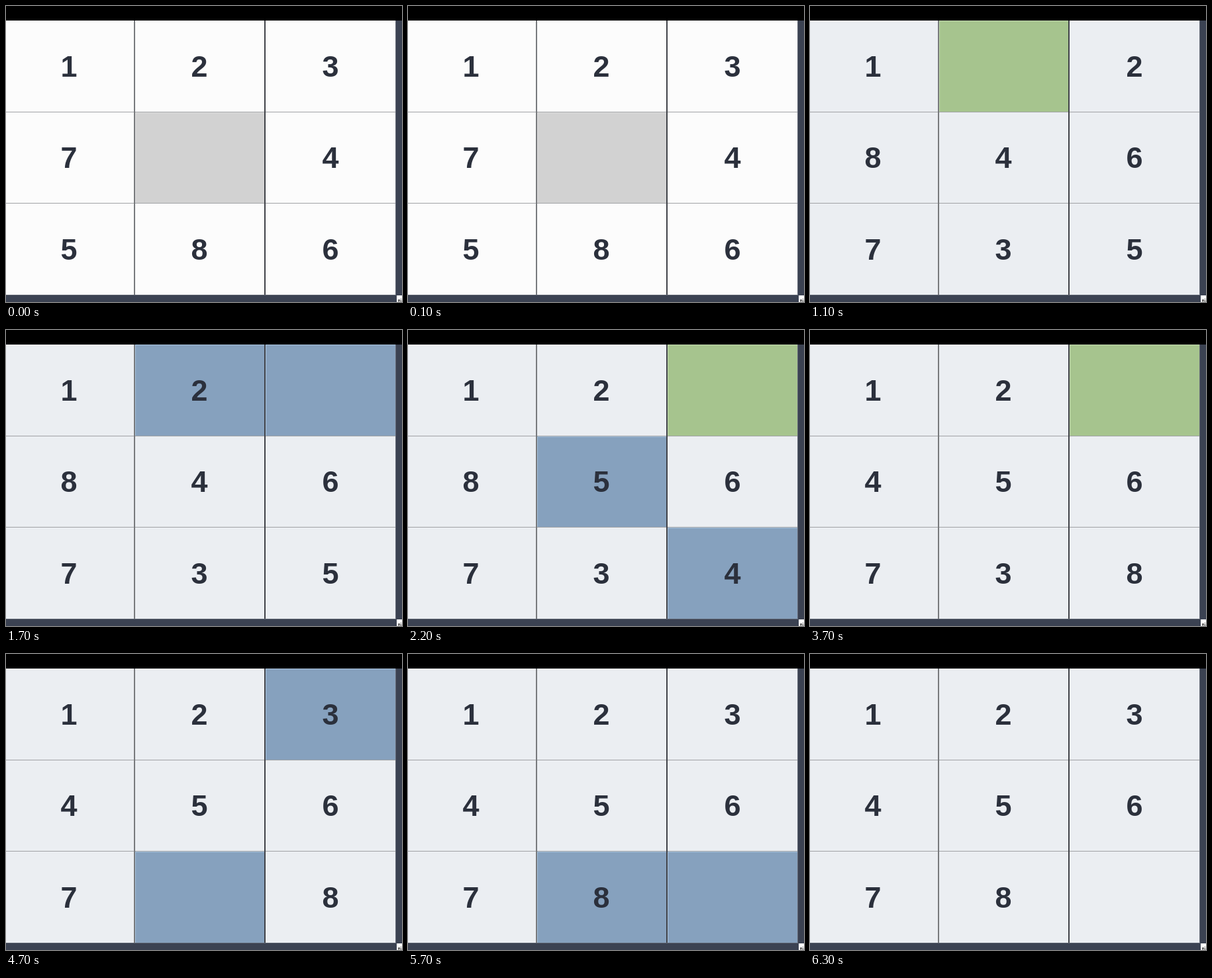
These frames come from a looping animation (598 by 448 pixels, 6.7 s). An HTML page:

```html
<!DOCTYPE html>
<html lang="en">
<head>
<meta charset="utf-8">
<title>Sliding puzzle</title>
<style>
  html, body { margin: 0; width: 100%; height: 100%; overflow: hidden; background: #3b4252; }
  svg { display: block; width: 598px; height: 448px; }
  .digit { font: bold 45px "Liberation Sans", Arial, sans-serif; text-anchor: middle; fill: #2b303c; }
  .tip { font: 11px "Liberation Sans", Arial, sans-serif; fill: #000; }
</style>
</head>
<body>
<svg viewBox="0 0 598 448">
  <rect width="598" height="448" fill="#3b4252"/>
  <rect width="598" height="22" fill="#000"/>
  <g id="board"></g>
  <g shape-rendering="crispEdges">
    <path d="M0 160.5H589M0 298.5H589" stroke="#a0a2a5"/>
    <path d="M0 437.5H589" stroke="#5d636f"/>
    <path d="M588.5 22V438" stroke="#696e7b"/>
    <path d="M194.5 22V437" stroke="#6b6d70"/>
    <path d="M193.5 22V437" stroke="#85878a"/>
    <path d="M391 22V437" stroke="#404248" stroke-width="2"/>
    <rect x="590" y="438" width="8" height="10" fill="#fff"/>
  </g>
  <text class="tip" x="592" y="451">ti</text>
</svg>
<script>
const LOOP = 6700;
const FILL = { white: '#fcfcfc', plain: '#ebeef2', gray: '#d2d2d2', green: '#a6c48e', blue: '#86a1be' };
const EDGE = { gray: '#dedede', green: '#c3dab0', blue: '#a9c4de' };

// start time, tiles in reading order, base colour, highlight colour, highlighted cells
const STEPS = [
  [0,    '1237 4586', 'white', 'gray', [4]],
  [1100, '1 2846735', 'plain', 'green', [1]],
  [1600, '12 846735', 'plain', 'blue', [1, 2]],
  [2200, '12 856734', 'plain', 'blue', [4, 8], 2],
  [2700, '12 856734', 'plain', 'green', [2]],
  [3200, '12 456738', 'plain', 'blue', [3, 8], 2],
  [3700, '12 456738', 'plain', 'green', [2]],
  [4700, '1234567 8', 'plain', 'blue', [2, 7]],
  [5200, '1234567 8', 'plain', 'green', [7]],
  [5700, '12345678 ', 'plain', 'blue', [7, 8]],
  [6300, '12345678 ', 'plain', 'plain', []]
];

const COLS = [[0, 193, 95], [195, 195, 292], [392, 196, 490]];
const ROWS = [[22, 138, 107], [161, 137, 245], [299, 138, 384]];
const board = document.getElementById('board');

function add(tag, attrs) {
  const el = document.createElementNS('http://www.w3.org/2000/svg', tag);
  for (const key in attrs) el.setAttribute(key, attrs[key]);
  return board.appendChild(el);
}

const cells = Array.from({ length: 9 }, (_, i) => {
  const [x, width, cx] = COLS[i % 3];
  const [y, height, baseline] = ROWS[Math.floor(i / 3)];
  return {
    rect: add('rect', { x, y, width, height }),
    edge: add('path', { d: `M${x + .5} ${y + height}V${y + .5}H${x + width}`, fill: 'none' }),
    text: add('text', { x: cx, y: baseline, class: 'digit' })
  };
});

let shown;
function show(step) {
  if (step === shown) return;
  shown = step;
  const [, tiles, base, accent, marked, blank] = step;
  cells.forEach((cell, i) => {
    const name = marked.includes(i) ? accent : i === blank ? 'green' : base;
    cell.rect.setAttribute('fill', FILL[name]);
    cell.edge.setAttribute('stroke', EDGE[name] || 'none');
    cell.text.textContent = tiles[i].trim();
  });
}

function tick() {
  const t = performance.now() % LOOP;
  show(STEPS.findLast(step => step[0] <= t));
  requestAnimationFrame(tick);
}
tick();
</script>
</body>
</html>
```
